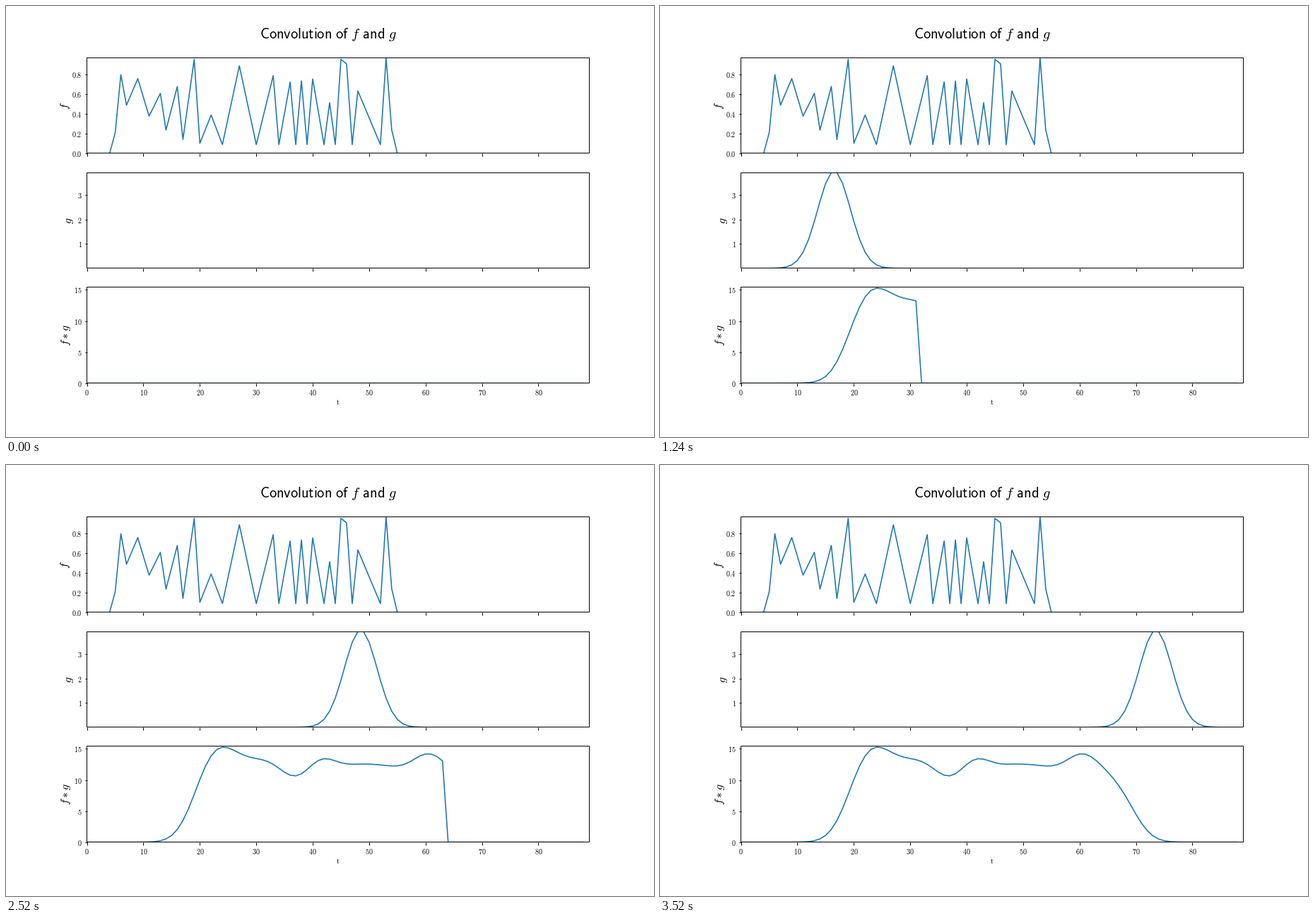
Animation of 917x611 px, one loop 3.56 s. Source, as a matplotlib script:

```python
import numpy as np
import matplotlib.pyplot as plt
from matplotlib.animation import FuncAnimation
from matplotlib.patches import Rectangle
from matplotlib.transforms import ScaledTranslation

WIDTH, HEIGHT, DPI = 917, 611, 72
STEPS, INTERVAL = 89, 40
KERNEL = 30  # samples in the sliding bell

plt.rcParams.update({"mathtext.fontset": "cm", "font.size": 10,
                     "xtick.major.width": 1, "ytick.major.width": 1})

t = np.arange(STEPS)


def jagged_signal():
    """Join a few peaks through valleys placed and sized by rule."""
    peaks = {6: 0.80, 9: 0.76, 13: 0.61, 16: 0.68, 19: 0.956, 22: 0.39,
             27: 0.89, 33: 0.79, 36: 0.725, 38: 0.736, 40: 0.757, 43: 0.515,
             45: 0.956, 48: 0.635, 53: 0.972}
    shoulders = {4: 0, 5: 0.21, 46: 0.91, 54: 0.24, 55: 0}
    x = np.array(list(peaks))
    drift = np.linspace(0, 1, len(x) - 1)
    valley_x = np.round(x[:-1] + np.diff(x) * (0.38 + 0.4 * drift ** 2))
    valley_y = 0.09 + 0.4 * np.exp(-((valley_x - 7) / 7) ** 2)
    knots = sorted({**peaks, **shoulders, **dict(zip(valley_x, valley_y))}.items())
    return np.interp(t, *zip(*knots))


signal = jagged_signal()
bell = 10 * np.exp(-np.linspace(-5, 5, KERNEL) ** 2 / 2) / np.sqrt(2 * np.pi)
result = np.convolve(signal, bell)[:STEPS]


def shifted_bell(step):
    """The bell with its last sample at the given step."""
    lag = step - t
    inside = (lag >= 0) & (lag < KERNEL)
    return np.where(inside, bell[np.clip(lag, 0, KERNEL - 1)], 0.0)


def math_label(pattern):
    return lambda value, _: f"${pattern % value}$"


def draw_frame(ax):
    """A crisp border on the pixels that contain the axes' edges."""
    half_pixel = 0.5 / DPI
    shift = ScaledTranslation(-half_pixel, half_pixel, fig.dpi_scale_trans)
    ax.spines[:].set_visible(False)
    ax.add_artist(Rectangle((0, 0), 1, 1, transform=ax.transAxes + shift,
                            fill=False, lw=1, zorder=2.5, clip_on=False))


fig, axes = plt.subplots(3, 1, sharex=True, dpi=DPI,
                         figsize=(WIDTH / DPI, HEIGHT / DPI))
fig.subplots_adjust(left=0.125, right=0.9, bottom=0.125, top=0.88, hspace=0.2)
fig.text(0.498, 1 - 46 / HEIGHT,
         r"$\mathsf{Convolution\ of}\ f\ \mathsf{and}\ g$",
         size=20.4, ha="center", va="baseline")

panels = [
    ("$f$", 0, "%.1f", np.arange(0, 0.9, 0.2), (0, signal.max())),
    ("$g$", 3.5, "%d", [1, 2, 3], (bell.min(), bell.max())),
    ("$f * g$", 2.5, "%d", [0, 5, 10, 15], (0, 15.4)),
]
lines = []
for ax, (name, pad, pattern, ticks, limits) in zip(axes, panels):
    lines += ax.plot(t, np.zeros(STEPS), color="C0", lw=1.6, snap=False)
    draw_frame(ax)
    ax.set_ylabel(name, size=16, labelpad=pad)
    ax.set_yticks(ticks)
    ax.yaxis.set_major_formatter(math_label(pattern))
    ax.set_ylim(*limits)

axes[-1].set_xlim(0, STEPS)
axes[-1].set_xticks(range(0, STEPS, 10))
axes[-1].xaxis.set_major_formatter(math_label("%d"))
axes[-1].set_xlabel(r"$\mathrm{t}$", labelpad=2)

signal_line, bell_line, result_line = lines
signal_line.set_ydata(signal)


def update(step):
    bell_line.set_ydata(shifted_bell(step))
    result_line.set_ydata(np.where(t <= step, result, 0.0))
    return bell_line, result_line


anim = FuncAnimation(fig, update, frames=STEPS, interval=INTERVAL,
                     repeat=True, repeat_delay=0, blit=False)
plt.show()
```
